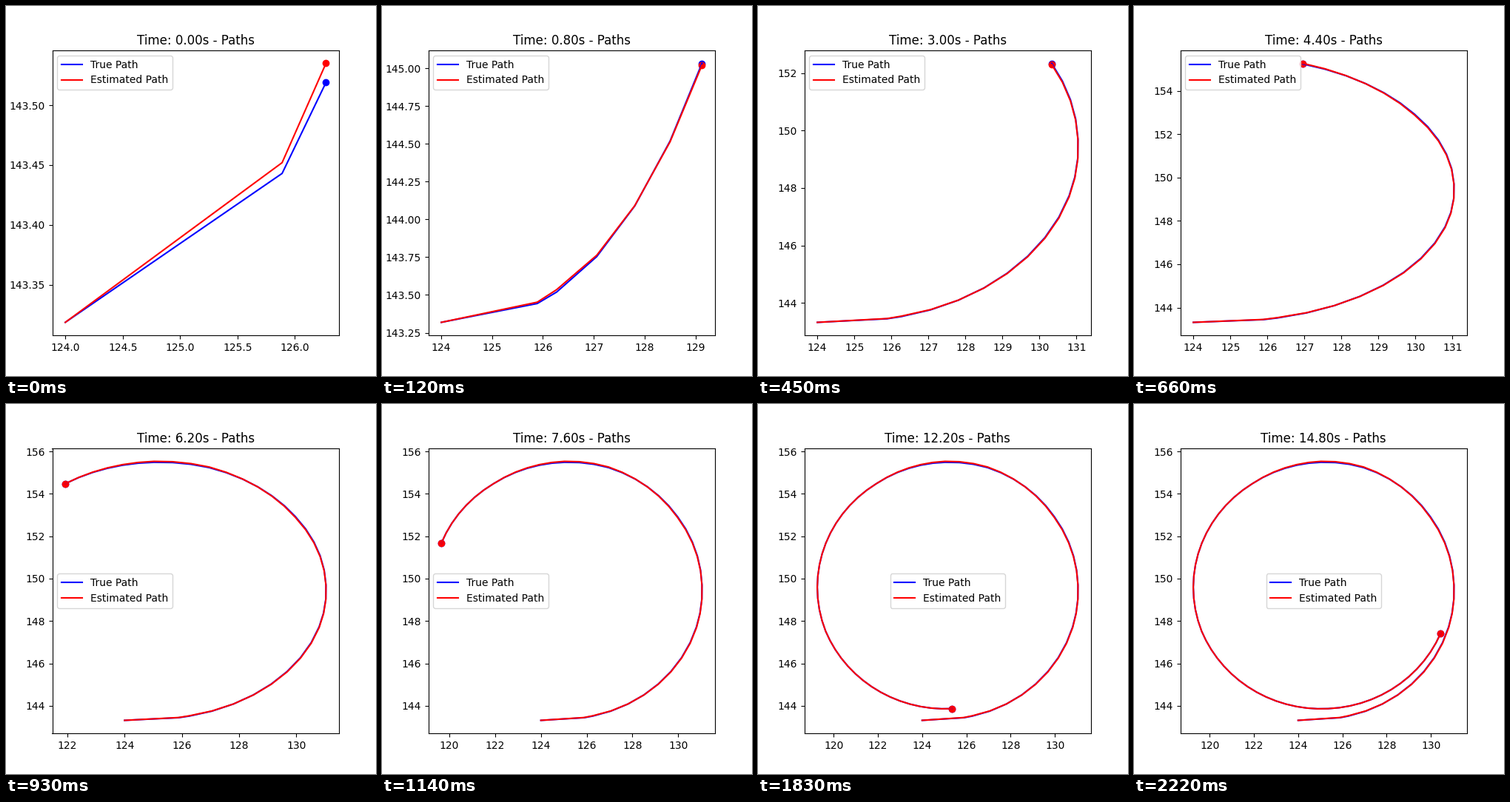
Recreate the animation shown at these times as a matplotlib script. Size 500x500 px, loop 2250 ms.

```python
import numpy as np
import matplotlib.pyplot as plt
from matplotlib.animation import FuncAnimation

FRAMES = 75
STEP = 0.2           # simulated seconds per frame
START = 3            # points already drawn in the first frame
CENTER_X, CENTER_Y = 125.1, 149.65

# Key points of the inward spiral:
# point index, angle in degrees, radius, vertical error of the estimate.
KEYS = np.array([
    (0, -99.856, 6.4263, 0),
    (1, -82.765, 6.2568, .009),
    (2, -79.196, 6.2416, .016),
    (10, -18.6, 6.015, -.04),
    (13, 0.7, 5.94, -.045),
    (18, 33.9, 5.87, -.04),
    (24, 71.6, 5.885, .03),
    (27, 90.7, 5.835, .045),
    (33, 123.3, 5.775, 0),
    (48, 201.3, 5.86, 0),
    (63, 272.5, 5.785, 0),
    (76, 337.4, 5.785, 0),
])


def build_paths():
    index = np.arange(FRAMES + START - 1)
    angle, radius, error = (np.interp(index, KEYS[:, 0], column)
                            for column in KEYS[:, 1:].T)
    angle = np.radians(angle)
    x = CENTER_X + radius * np.cos(angle)
    y = CENTER_Y + radius * np.sin(angle)
    return (x, y), (x, y + error)


true_path, est_path = build_paths()
SERIES = ((true_path, "blue", "True Path"),
          (est_path, "red", "Estimated Path"))

fig, ax = plt.subplots(figsize=(5, 5), dpi=100)


def draw(frame):
    ax.clear()
    n = frame + START
    for (x, y), color, label in SERIES:
        ax.plot(x[:n], y[:n], color=color, label=label)
        ax.scatter(x[n - 1], y[n - 1], color=color)
    ax.set_title(f"Time: {frame * STEP:.2f}s - Paths")
    ax.legend()


anim = FuncAnimation(fig, draw, frames=FRAMES, init_func=lambda: None,
                     interval=30, repeat=True)
plt.show()
```
